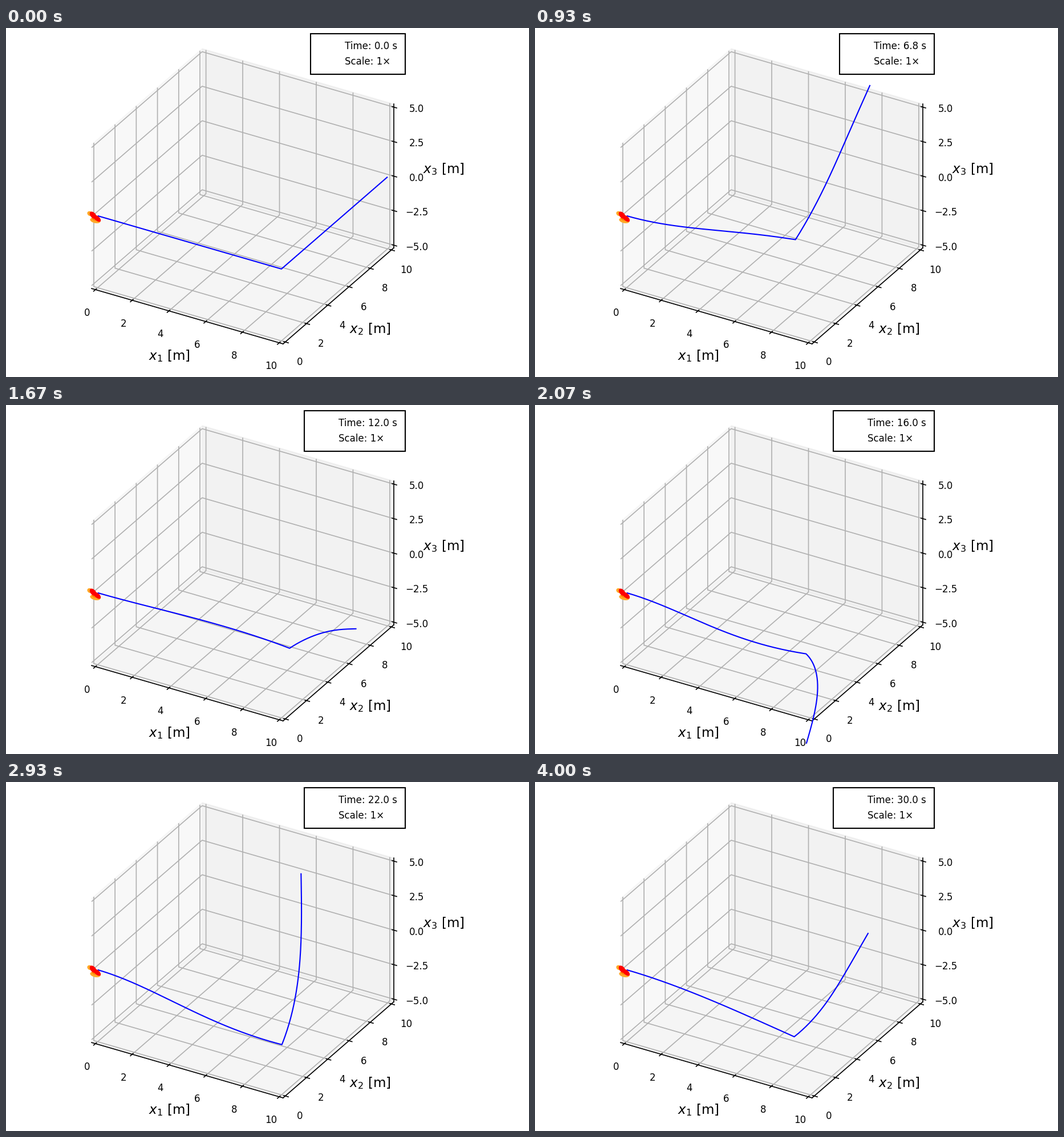
Animation, 917 px wide and 611 px high, one loop 4030 ms. Source, as a matplotlib script:

```python
import matplotlib.pyplot as plt
import numpy as np
from matplotlib.animation import FuncAnimation
from matplotlib.lines import Line2D
from matplotlib.patches import Ellipse
from matplotlib.transforms import IdentityTransform

W, H, DPI = 917, 611, 150
LOOP_MS, FRAMES = 4030, 121
FRAME_DT, SUBSTEPS = 0.25, 120

# L-shaped frame: two legs of length 10, clamped at the origin
LEG, N = 10.0, 16
STEP = LEG / N
STRETCH, BEND = 4e4, 1e3     # stretch is softened to allow larger time steps
PEAK = 50.0

HAT = np.array([[0, 0, 0, 0, 0, -1, 0, 1, 0],
                [0, 0, 1, 0, 0, 0, -1, 0, 0],
                [0, -1, 0, 1, 0, 0, 0, 0, 0]], float)


def hat(w):
    return (w @ HAT).reshape(-1, 3, 3)


def apply(m, w):
    return (m @ w[..., None])[..., 0]


def pulse(t):
    """Triangular load on the elbow, over after two seconds."""
    return PEAK * max(0.0, 1 - abs(t - 1))


def lump(per_element):
    nodal = np.zeros((2 * N + 1, per_element.shape[1]))
    nodal[:-1] += per_element / 2
    nodal[1:] += per_element / 2
    return nodal


def curve(x, t0, t1, parts=5):
    """Smooth polyline through the nodes with the given end tangents."""
    s = np.linspace(0, 1, parts, endpoint=False)[:, None]
    a, b = x[:-1, None], x[1:, None]
    ta, tb = STEP * t0[:, None], STEP * t1[:, None]
    p = (a * (1 + 2 * s) * (1 - s) ** 2 + ta * s * (1 - s) ** 2
         + b * s ** 2 * (3 - 2 * s) + tb * s ** 2 * (s - 1))
    return np.vstack([p.reshape(-1, 3), x[-1]])


def simulate():
    """Geometrically exact beam, explicit leapfrog integration."""
    axis = np.zeros((2 * N, 3, 1))
    axis[:N, 0] = axis[N:, 1] = 1
    x = np.vstack([np.zeros(3), np.cumsum(axis[..., 0], axis=0) * STEP])
    v, spin = np.zeros_like(x), np.zeros_like(x)
    rot = np.tile(np.eye(3), (2 * N + 1, 1, 1))
    inv_mass = 1 / lump(np.full((2 * N, 1), STEP))
    inv_inertia = 1 / lump(STEP * 10 * (1 + axis[..., 0]))
    inv_mass[0] = inv_inertia[0] = 0     # clamp
    dt = FRAME_DT / SUBSTEPS

    shapes = []
    for k in range((FRAMES - 1) * SUBSTEPS + 1):
        t0, t1 = rot[:-1] @ axis, rot[1:] @ axis
        if k % SUBSTEPS == 0:
            shapes.append(curve(x, t0[..., 0], t1[..., 0]))

        force = STRETCH * ((x[1:] - x[:-1]) / STEP - (t0 + t1)[..., 0] / 2)
        turn = rot[1:] @ rot[:-1].transpose(0, 2, 1)
        w = turn.reshape(-1, 9) @ HAT.T / 2
        moment = BEND / STEP * w * (1 + (w * w).sum(1, keepdims=True) / 6)

        f, torque = np.zeros_like(x), np.zeros_like(x)
        f[:-1] += force
        f[1:] -= force
        f[N, 2] += pulse(k * dt)
        arm = hat(force) * (STEP / 2)
        torque[:-1] += moment - (arm @ t0)[..., 0]
        torque[1:] -= moment + (arm @ t1)[..., 0]

        v += dt * inv_mass * f
        x = x + dt * v
        spin += dt * torque
        body = apply(rot.transpose(0, 2, 1), spin)
        body = body + dt / 2 * apply(hat(body), body * inv_inertia)
        rate = hat(dt * body * inv_inertia)
        change = rot @ rate
        rot = rot + change + change @ rate / 2
    return shapes


shapes = simulate()

# A hair above whole pixels, so rounding never drops one
fig = plt.figure(figsize=((W + 1e-6) / DPI, (H + 1e-6) / DPI), dpi=DPI,
                 facecolor="white")
SIDE = 602.4
ax = fig.add_axes([105.5 / W, 6.9 / H, SIDE / W, SIDE / H],
                  projection="3d", proj_type="ortho")
ax.view_init(elev=30, azim=-60)

line, = ax.plot(*shapes[0].T, color="blue", lw=1, solid_capstyle="butt")

pad = LEG / 48
ax.set_xticks(np.arange(0, 11, 2))
ax.set_yticks(np.arange(0, 11, 2))
ax.set_zticks(np.arange(-5, 5.1, 2.5))
ax.set_xlim(-pad, LEG + pad)
ax.set_ylim(-pad, LEG + pad)
ax.set_zlim(-LEG / 2 - pad, LEG / 2 + pad)
ax.tick_params(labelsize=8)
for i, a in enumerate((ax.xaxis, ax.yaxis, ax.zaxis), 1):
    a.set_rotate_label(False)
    a.set_label_text(f"$x_{i}$ [m]", fontsize=11)

blank = [Line2D([], [], lw=0) for _ in range(2)]
legend = ax.legend(blank, ["Time: 0.0 s", "Scale: 1×"], loc="upper right",
                   fontsize=8, fancybox=False, framealpha=1,
                   facecolor="white", edgecolor="black", borderpad=0.8)
clock = legend.get_texts()[0]

# Clamp symbol: x, y, width, height, tilt, colour
for cx, cy, w, h, tilt, color in (
        (147.2, 325, 10, 8, -30, "#ffa826"),
        (156.5, 337, 18.5, 9, -12, "#ffa826"),
        (155.5, 333.5, 11, 7, -20, "#ff8000"),
        (152.8, 327.8, 15, 9, -48, "red"),
        (160, 333.5, 15, 8, -42, "red")):
    fig.add_artist(Ellipse((cx, H - cy), w, h, angle=tilt, fc=color, ec="none",
                           transform=IdentityTransform()))


def update(i):
    line.set_data_3d(*shapes[i].T)
    # two significant digits
    clock.set_text(f"Time: {float(f'{i * FRAME_DT:.2g}')} s")
    return line, clock


anim = FuncAnimation(fig, update, frames=FRAMES, interval=LOOP_MS / FRAMES,
                     repeat=True, cache_frame_data=False)
plt.show()
```
